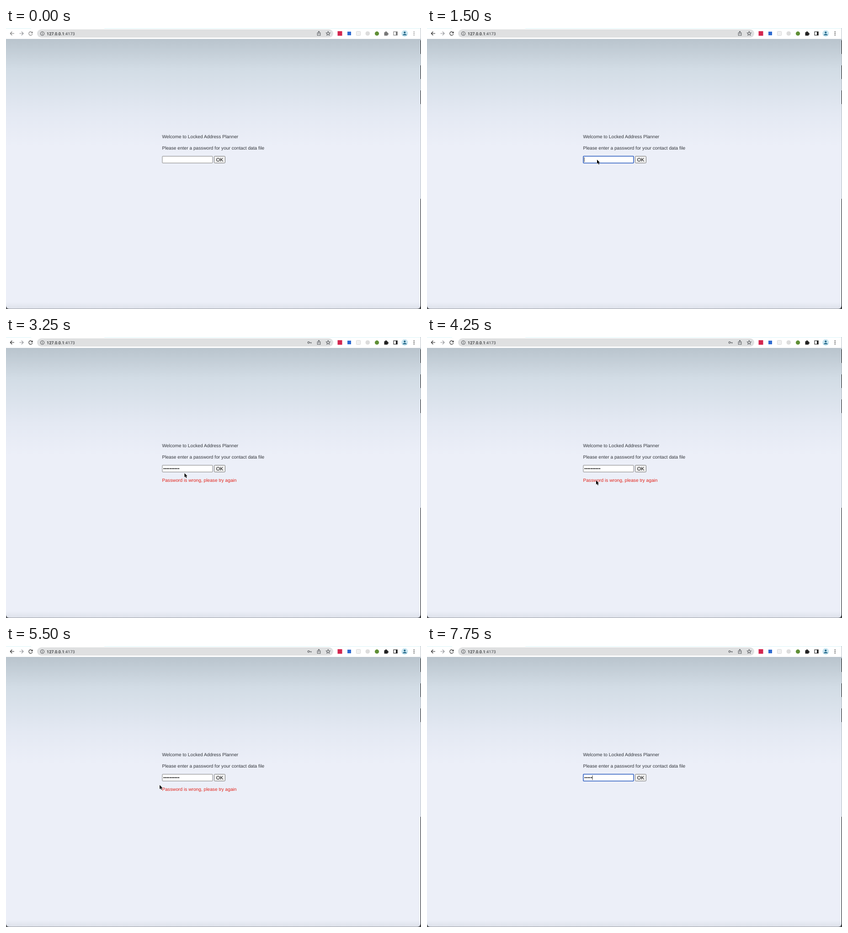
Animation, 908 px wide and 617 px high, one loop 8000 ms. Source, as an HTML page:

```html
<!DOCTYPE html>
<html lang="en">
<head>
<meta charset="utf-8">
<title>Password prompt</title>
<style>
  html, body { margin: 0; width: 100%; height: 100%; overflow: hidden; background: #eceff8; }
  svg { display: block; }
  text { font: 10.2px "Liberation Sans", Arial, sans-serif; fill: #33363c; text-rendering: geometricPrecision; }
  .url { font: 500 9.1px Roboto, sans-serif; fill: #26282b; }
  .ok { font-size: 10.8px; fill: #000; }
  .dots { font-size: 9px; letter-spacing: .4px; fill: #000; }
  .line { fill: none; stroke: currentColor; stroke-width: 1.1; }
  .solid { fill: currentColor; }
  .tool { color: #777; }
  .active .tool { color: #222; }
  .grey { color: #55585c; }
  .field { fill: #fff; stroke: #808080; }
  .focus .field { stroke: #2457bd; stroke-width: 1.5; }
</style>
</head>
<body>
<svg id="stage" width="908" height="617" viewBox="0 0 908 617">
  <defs>
    <linearGradient id="sky" gradientUnits="userSpaceOnUse" x1="0" y1="24" x2="0" y2="260">
      <stop offset="0" stop-color="#b9c4cd"/>
      <stop offset=".28" stop-color="#d2dce5"/>
      <stop offset=".7" stop-color="#e4e9f3"/>
      <stop offset="1" stop-color="#eceff8"/>
    </linearGradient>
    <linearGradient id="shade" x1="0" y1="0" x2="0" y2="1">
      <stop offset="0" stop-color="#8c929c" stop-opacity="0"/>
      <stop offset="1" stop-color="#8c929c" stop-opacity=".16"/>
    </linearGradient>
    <clipPath id="frame"><rect y="-20" width="907" height="636.5" rx="7"/></clipPath>
  </defs>

  <!-- window -->
  <rect width="908" height="617" fill="#55585c"/>
  <g clip-path="url(#frame)">
    <rect y="24" width="907" height="593" fill="url(#sky)"/>
    <rect y="602" width="907" height="15" fill="url(#shade)"/>
    <rect width="907" height="24" fill="#fff"/>
  </g>
  <path d="M0 .4H55M215 .4H907" stroke="#cdf1f5" stroke-width=".9"/>
  <path d="M907.5 0V375" stroke="#b4bbc1"/>
  <path d="M907.5 27V184" stroke="#111" stroke-dasharray="30 25"/>
  <path d="M907.5 375V617" stroke="#111"/>

  <!-- toolbar -->
  <rect x="68" y="3" width="648" height="18" rx="9" fill="#dfe0e1"/>
  <g class="tool">
    <path class="line" d="M18 12H9.5M13.3 8L9.3 12L13.3 16"/>
    <path class="line" d="M57.3 10A4 4 0 1 0 57.8 13.2"/>
    <path class="solid" d="M58.4 7.6V11.4H54.6Z"/>
    <rect class="solid" x="827.5" y="9.2" width="7.6" height="7.6" rx=".8"/>
    <circle class="solid" cx="831.5" cy="9" r="1.7"/>
    <circle class="solid" cx="835.4" cy="13" r="1.7"/>
    <rect class="line" x="848" y="8.2" width="8" height="7.6"/>
    <path class="solid" d="M853 8H856.4V16H853Z"/>
    <path class="line" d="M892.7 8.6V15.5" style="stroke-width:2" stroke-linecap="round" stroke-dasharray="0 3.4"/>
  </g>
  <path class="line" color="#8b8e92" d="M29.5 12H38M34 8L38 12L34 16"/>
  <g class="grey">
    <circle class="line" cx="79.5" cy="12.2" r="4"/>
    <path class="line" d="M79.5 11.6V14.6M79.5 9.6V10.6"/>
    <path class="line" d="M683 10.5H681.3V16.3H687.7V10.5H686M684.5 14V7.5M682.6 9.2L684.5 7.3L686.4 9.2"/>
    <path class="line" id="star"/>
    <g id="key">
      <circle class="line" cx="662" cy="12.3" r="1.9"/>
      <path class="line" d="M664 12.3H668.8M667.3 12.3V14.6"/>
    </g>
  </g>
  <text class="url" x="89" y="15.5">127.0.0.1<tspan fill="#5a5d61">:4173</tspan></text>

  <!-- extensions and profile -->
  <rect x="725.5" y="7" width="10" height="10" fill="#d3264f"/>
  <rect x="747" y="8" width="8" height="8" fill="#2f6bd0"/>
  <rect x="766.5" y="7.5" width="9" height="9" rx="1" fill="#f1f1f1" stroke="#d5d5d5"/>
  <circle cx="791.3" cy="12" r="4.8" fill="#dcdcdc"/>
  <circle cx="811.5" cy="12.2" r="4.6" fill="#5f8f35"/>
  <circle cx="872.3" cy="12" r="7.2" fill="#c8e5f0"/>
  <circle cx="872.3" cy="9.9" r="2.1" fill="#24698a"/>
  <path d="M868 16V15Q872.3 11 876.6 15V16Z" fill="#24698a"/>

  <!-- form -->
  <text x="341.4" y="241.5">Welcome to Locked Address Planner</text>
  <text x="341.4" y="267">Please enter a password for your contact data file</text>
  <rect class="field" x="342" y="281.6" width="110" height="14.8" rx="1"/>
  <text class="dots" id="dots" x="344.2" y="292.3"></text>
  <path id="caret" d="M0 284V294.2" stroke="#000" stroke-width=".8"/>
  <rect x="455.5" y="281.5" width="24" height="15" rx="1.8" fill="#efefef" stroke="#767676"/>
  <text class="ok" x="467.6" y="292.6" text-anchor="middle">OK</text>
  <rect id="mark" x="341.3" y="307" width="162.7" height="15" fill="#b3cdf3"/>
  <text id="error" x="341.4" y="318" style="fill:#e2231a">Password is wrong, please try again</text>

  <path id="pointer" d="M0 0V9L2 7.1L3.5 10.4L5.1 9.7L3.6 6.5H6.3Z" stroke="#fff" stroke-width=".8" paint-order="stroke"/>
</svg>
<script>
  const LOOP = 8000, STEP = 250, PITCH = 3.55;
  const el = id => document.getElementById(id);

  // The pointer's resting places: time, x, y.
  const stops = [
    [250, 432, 460], [1250, 372, 289], [1750, 372, 289], [2500, 466, 290], [2750, 466, 290],
    [3250, 390.5, 299], [3750, 370, 315], [4250, 370, 315], [5000, 361, 297], [5750, 327.5, 308]
  ];

  const clamp = (v, lo, hi) => Math.min(hi, Math.max(lo, v));
  const during = (t, from, to) => t >= from && t < to;
  const show = (id, on) => el(id).setAttribute('visibility', on ? 'visible' : 'hidden');
  const move = (id, x, y) => el(id).setAttribute('transform', `translate(${x} ${y})`);

  function pointerAt(t) {
    const i = clamp(stops.findIndex(s => s[0] > t), 1, stops.length) - 1;
    const [t0, x0, y0] = stops[i], [t1, x1, y1] = stops[i + 1];
    const k = clamp((t - t0) / (t1 - t0), 0, 1);
    const ease = k * k * (3 - 2 * k);
    return [x0 + (x1 - x0) * ease, y0 + (y1 - y0) * ease];
  }

  // Ten characters on the first try, then a slower second one after the reload.
  const typedAt = t => t < 6250
    ? clamp(Math.round((t - 1500) / 103), 0, 10)
    : clamp(Math.floor((t - 6500) / 250), 0, 5);

  function starPath(cx, cy, r) {
    const points = Array.from({ length: 10 }, (_, i) => {
      const a = i * Math.PI / 5, d = i % 2 ? r * .45 : r;
      return [cx + d * Math.sin(a), cy - d * Math.cos(a)];
    });
    return `M${points.join('L')}Z`;
  }

  function draw(t) {
    const count = typedAt(t);
    const focus = during(t, 750, 2750) || t >= 6250;
    const pointing = during(t, stops[0][0], 6250);

    el('stage').classList.toggle('active', t >= 750);
    el('stage').classList.toggle('focus', focus);
    show('key', count > 0);
    show('error', during(t, 3000, 6250));
    show('mark', during(t, 4500, 5500));

    el('dots').textContent = '•'.repeat(count);
    show('caret', focus);
    move('caret', 344.2 + PITCH * count, 0);

    show('pointer', pointing);
    if (pointing) move('pointer', ...pointerAt(Math.min(t, stops.at(-1)[0] - 1)));
  }

  function tick() {
    const t = performance.now() % LOOP;
    draw(t - t % STEP);
    requestAnimationFrame(tick);
  }

  el('star').setAttribute('d', starPath(704.8, 12.2, 4.6));
  tick();
</script>
</body>
</html>
```
